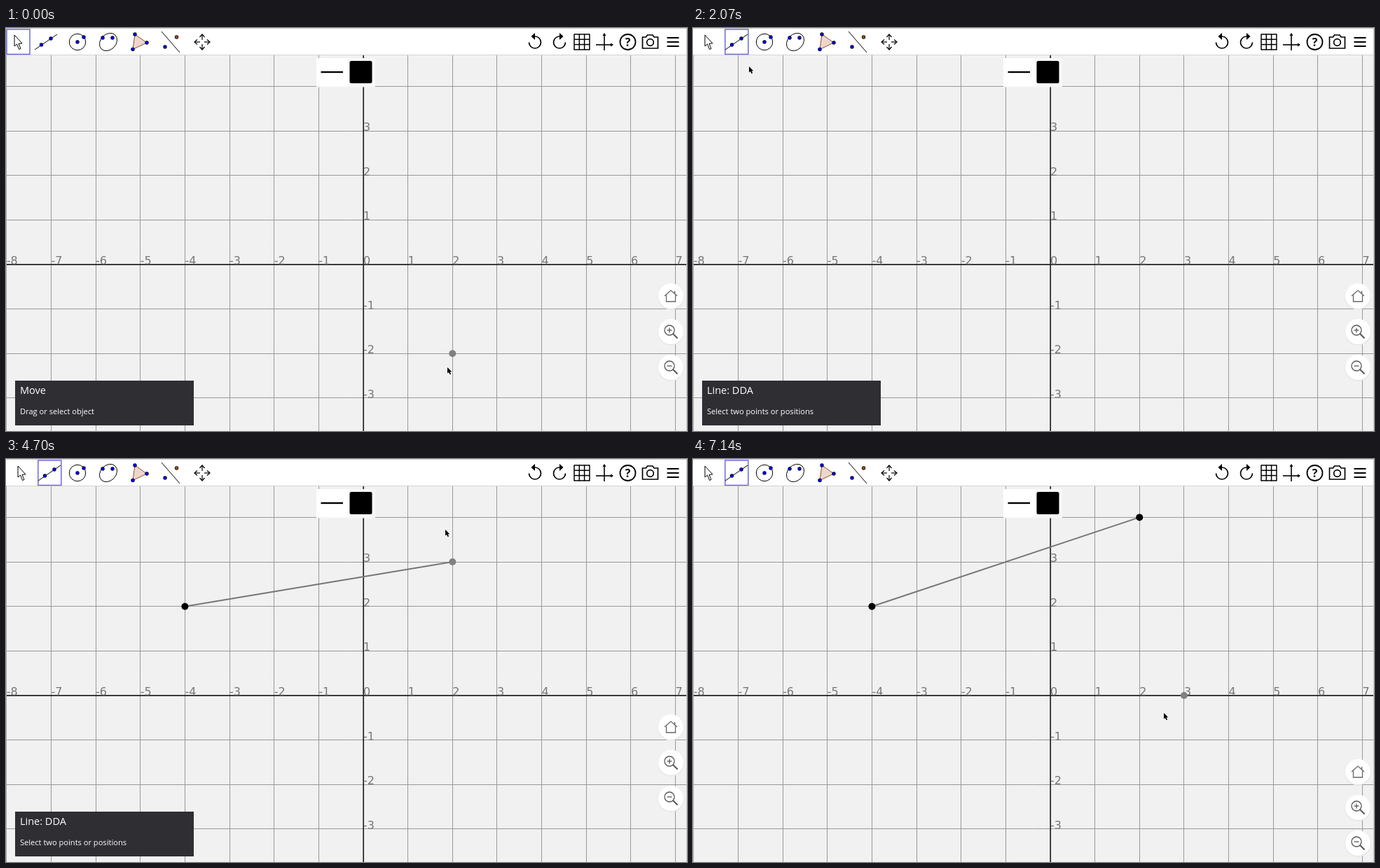
These frames come from a looping animation (972x576 px, 8990 ms). An HTML page with a canvas:

```html
<!DOCTYPE html>
<html lang="en">
<head>
<meta charset="utf-8">
<title>Drawing a line</title>
<style>
html, body { margin: 0; width: 100%; height: 100%; overflow: hidden; background: #f1f1f1; }
canvas { display: block; width: 972px; height: 576px; }
</style>
</head>
<body>
<canvas id="stage" width="972" height="576"></canvas>
<script>
const c = document.getElementById('stage').getContext('2d');
const LOOP = 8990, UNIT = 63.65, OX = 510, OY = 338, LAG = 130;
const BLUE = '#0000f0', TAU = Math.PI * 2;
const A = { x: -4, y: 2 }, B = { x: 2, y: 4 };
const START = { x: 630, y: 485 };

// Pointer moves: first step, last step, number of steps, x, y, sag
const MOVES = [
  [270, 1030, 12, 56, 34, 0],
  [1090, 1090, 1, 55.5, 32.5, 0],
  [1380, 1380, 1, 62, 44, 0],
  [1550, 1720, 4, 79, 54, 0],
  [2000, 2000, 1, 80, 55, 0],
  [2130, 2670, 9, 253, 221, 0],
  [2735, 2800, 2, 255, 214, 0],
  [2930, 3000, 2, 255, 210, 0],
  [3440, 4300, 14, 600, 172, 42],
  [4370, 4700, 6, 627, 101, 0],
  [4780, 5180, 7, 638, 83, 0],
  [5910, 5910, 1, 639, 84, 0],
  [6520, 6990, 8, 674, 366, 0],
  [7070, 7140, 2, 672, 363, 0]
];
const CLICKS = [[1220, 1380], [1920, 2000], [3170, 3300], [6110, 6190]];

const px = x => OX + x * UNIT;
const py = y => OY - y * UNIT;
const within = (t, [a, b]) => t >= a && t < b;

function pointer(t) {
  let p = START;
  for (const [t0, t1, n, x, y, sag] of MOVES) {
    if (t < t0) break;
    const step = n > 1 ? Math.min(n, 1 + Math.floor((t - t0) / (t1 - t0) * (n - 1) + 0.01)) : 1;
    const u = step / n, e = u * u * (3 - 2 * u);
    p = { x: p.x + (x - p.x) * e, y: p.y + (y - p.y) * e + sag * 4 * e * (1 - e) };
  }
  return p;
}

function snapped(t) {
  const late = pointer(t - LAG);
  if (late.y < 62 || pointer(t).y < 41) return null;
  return { x: Math.round((late.x - OX) / UNIT), y: Math.round((OY - late.y) / UNIT) };
}

function rect(x, y, w, h, fill) {
  c.fillStyle = fill;
  c.fillRect(x, y, w, h);
}

function path(points, { stroke, fill, width = 1, close = false }) {
  c.beginPath();
  points.forEach(([x, y]) => c.lineTo(x, y));
  if (close) c.closePath();
  if (fill) { c.fillStyle = fill; c.fill(); }
  if (stroke) { c.strokeStyle = stroke; c.lineWidth = width; c.stroke(); }
}

const line = (x1, y1, x2, y2, stroke = '#000', width = 1) =>
  path([[x1, y1], [x2, y2]], { stroke, width });

function disc(x, y, r, fill) {
  c.beginPath();
  c.arc(x, y, r, 0, TAU);
  c.fillStyle = fill;
  c.fill();
}

function ring(x, y, r, width = 1, stroke = '#000', from = 0, to = TAU) {
  c.beginPath();
  c.arc(x, y, r, from, to);
  c.strokeStyle = stroke;
  c.lineWidth = width;
  c.stroke();
}

function text(s, x, y, font, fill, align = 'left') {
  c.font = font;
  c.fillStyle = fill;
  c.textAlign = align;
  c.fillText(s, x, y);
}

function at(x, y, draw, flip = 1) {
  c.save();
  c.translate(x, y);
  c.scale(flip, 1);
  draw();
  c.restore();
}

function node(x, y, fill = BLUE) {
  disc(x, y, 2.7, '#000');
  disc(x, y, 2.1, fill);
}

function grid() {
  rect(0, 0, 972, 576, '#f1f1f1');
  for (let k = -8; k <= 7; k++) {
    const x = Math.floor(px(k)) + 0.5;
    line(x, 39, x, 576, '#999');
  }
  for (let k = -3; k <= 4; k++) {
    const y = Math.floor(py(k)) + 0.5;
    line(0, y, 971, y, '#999');
  }
  line(0, OY + 0.2, 971, OY + 0.2, '#222', 1.7);
  line(OX + 0.2, 39, OX + 0.2, 576, '#222', 1.7);
  const font = '16px "DejaVu Sans", sans-serif';
  for (let k = -8; k <= 7; k++) text(k, px(k), OY, font, '#777');
  for (let k = -3; k <= 3; k++) if (k) text(k, OX, py(k), font, '#777');
}

function drawing(t) {
  const anchored = t >= 3440, done = t >= 6520, tip = snapped(t);
  const dot = (p, fill) => disc(px(p.x), py(p.y), 5, fill);
  const end = done ? B : tip;
  if (anchored && end) line(px(A.x), py(A.y), px(end.x), py(end.y), '#777', 2);
  if (tip) dot(tip, '#808080');
  if (anchored) dot(A, '#000');
  if (done) dot(B, '#000');
}

function lineIcon(x, y) {
  at(x, y, () => {
    line(-16, 11, 16, -11);
    node(-6.5, 4);
    node(7, -5);
  });
}

function turnArrow(x, flip) {
  at(x, 20, () => {
    ring(0, 0.5, 8.5, 1.7, '#000', -Math.PI / 2, Math.PI);
    path([[0, -13], [0, -3], [-5.5, -8]], { fill: '#000', close: true });
  }, flip);
}

function toolbar(lineTool) {
  rect(0, 0, 972, 38, '#fff');
  line(0, 38.5, 972, 38.5, '#d5d5d5');
  line(0, 0.5, 972, 0.5, '#ccc');
  c.strokeStyle = '#6c6cdc';
  c.lineWidth = 1.5;
  c.strokeRect(lineTool ? 45.8 : 1, 2, 33, 35.5);

  at(lineTool ? 17 : 12, 10, () => path(
    [[0, 0], [0, 16], [3.6, 13], [6.5, 20.5], [9, 19.5], [6, 12.3], [11, 12]],
    { stroke: '#000', fill: '#fff', close: true }));
  lineIcon(lineTool ? 62 : 57, 20);

  ring(102, 20, 11.7);
  node(102, 20);
  node(111, 13);

  c.beginPath();
  c.ellipse(146, 20, 14, 11, -0.8, 0, TAU);
  c.lineWidth = 1;
  c.strokeStyle = '#000';
  c.stroke();
  node(138, 14);
  node(152, 14);

  const corners = [[184, 9], [201, 21], [181, 30.5]];
  path(corners, { stroke: '#964b32', fill: '#ecd7cc', close: true });
  corners.forEach(([x, y]) => node(x, y));

  line(222, 5, 248, 35);
  node(227, 27);
  node(243.5, 13, '#964b14');

  for (let i = 0; i < 4; i++) {
    c.save();
    c.translate(280, 20);
    c.rotate(i * Math.PI / 2);
    line(0, -3, 0, -10, '#000', 1.2);
    path([[-3.5, -7], [0, -11], [3.5, -7]], { stroke: '#000', width: 1.2 });
    c.restore();
  }

  turnArrow(755, 1);
  turnArrow(790, -1);

  for (let i = 0; i < 4; i++) {
    const d = i * 7.3;
    line(811, 9 + d, 833, 9 + d, '#000', 1.5);
    line(811 + d, 8.5, 811 + d, 31.5, '#000', 1.5);
  }

  line(842, 24, 866, 24, '#000', 1.6);
  line(854, 8, 854, 32, '#000', 1.6);
  path([[851.5, 11], [854, 7], [856.5, 11]], { fill: '#000', close: true });
  path([[863, 21.5], [867, 24], [863, 26.5]], { fill: '#000', close: true });

  ring(887.5, 20, 11, 1.8);
  text('?', 887.5, 26, 'bold 16px "Open Sans", sans-serif', '#000', 'center');

  path([[908.5, 13], [913.5, 13], [915.5, 10], [923, 10], [925, 13], [930.5, 13], [930.5, 29], [908.5, 29]],
    { stroke: '#000', width: 1.7, close: true });
  ring(919.5, 20.5, 4.8, 1.7);

  for (const y of [14, 20, 26]) line(943.5, y, 960.5, y, '#000', 2);
}

function stylePopup() {
  rect(443, 43, 84, 41.5, '#f8f8f8');
  rect(443, 43, 45, 40, '#fff');
  line(449.5, 63, 481, 63, '#000', 2.4);
  c.beginPath();
  c.roundRect(490.5, 47, 32, 32, 2.5);
  c.fillStyle = '#000';
  c.fill();
}

function menu(t) {
  if (!within(t, [1380, 2000])) return;
  rect(36, 40, 149, 80, '#fff');
  const hover = Math.max(0, Math.min(4, 1 + Math.floor((t - 1550) / 57))) / 4;
  rect(36, 41, 149, 37, `rgba(0,0,0,${0.08 * hover})`);
  ['Line: DDA', 'Line: Bresenham'].forEach((label, i) => {
    lineIcon(59, 60 + i * 39);
    text(label, 81, 64 + i * 39, '12.5px "Open Sans", sans-serif', '#222');
  });
}

function roundButton(y, icon) {
  disc(949, y + 1, 18.8, '#e7e7e7');
  disc(949, y, 18, '#fff');
  at(949, y, icon);
}

function lens(plus) {
  ring(-2, -2, 7, 1.3, '#555');
  line(3, 3, 9.5, 9.5, '#555', 2);
  line(-5.5, -2, 1.5, -2, '#555', 1.3);
  if (plus) line(-2, -5.5, -2, 1.5, '#555', 1.3);
}

function zoomButtons(y) {
  roundButton(y, () => {
    path([[-9, 0], [0, -8], [9, 0]], { stroke: '#666', width: 1.3 });
    path([[-6.5, -1.5], [-6.5, 8], [6.5, 8], [6.5, -1.5]], { stroke: '#666', width: 1.3 });
    line(5.5, -7, 5.5, -3, '#666', 1.5);
  });
  roundButton(y + 51, () => lens(true));
  roundButton(y + 102, () => lens(false));
}

function hint(lineTool) {
  rect(13, 504, 255, 64, '#2f2e33');
  text(lineTool ? 'Line: DDA' : 'Move', 20, 522.5, '14.5px "Open Sans", sans-serif', '#fff');
  text(lineTool ? 'Select two points or positions' : 'Drag or select object',
    20, 552, '11.1px "Open Sans", sans-serif', '#fff');
}

function cursor(t) {
  const { x, y } = pointer(t);
  if (CLICKS.some(span => within(t, span))) {
    c.globalCompositeOperation = 'multiply';
    disc(x, y, 9.5, '#fff24a');
    c.globalCompositeOperation = 'source-over';
  }
  at(Math.round(x), Math.round(y), () => path(
    [[0, 0], [0, 8.6], [2, 6.9], [3.6, 10.2], [5.1, 9.5], [3.6, 6.4], [6.2, 6.2]],
    { fill: '#000', close: true }));
}

function render() {
  const t = performance.now() % LOOP;
  const lineTool = t >= 1380, hinting = t < 6520;
  grid();
  drawing(t);
  line(0.5, 0, 0.5, 576, '#aaa');
  toolbar(lineTool);
  line(971.5, 0, 971.5, 576, '#ccc');
  stylePopup();
  zoomButtons(hinting ? 383 : 447);
  if (hinting) hint(lineTool);
  menu(t);
  cursor(t);
  requestAnimationFrame(render);
}
render();
</script>
</body>
</html>
```
